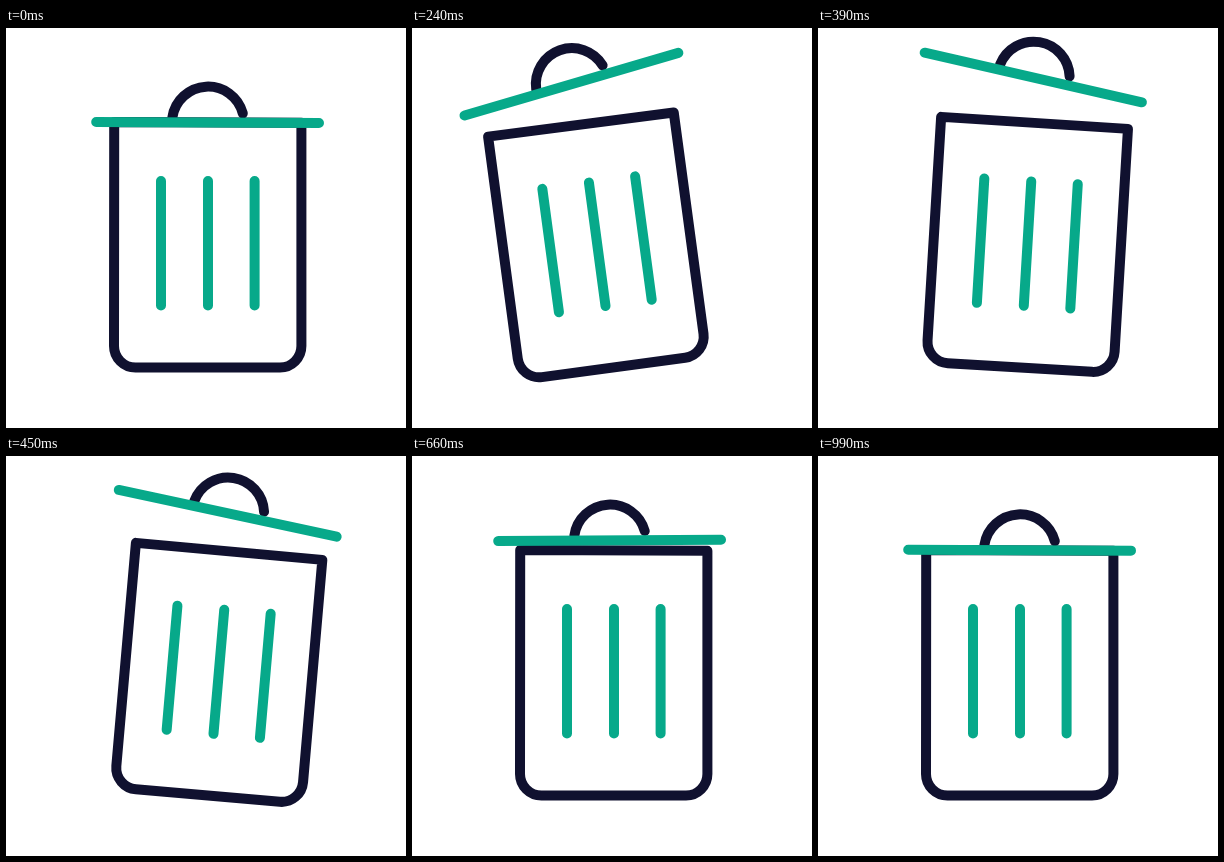
Write an HTML page that moves like this. It is 400 by 400 pixels and loops after 1.02 s.

```html
<!DOCTYPE html>
<html lang="en">
<head>
<meta charset="utf-8">
<title>Bin</title>
<style>
  html, body { margin: 0; height: 100%; overflow: hidden; background: #fff; }
  svg { display: block; width: 100%; height: 100%; }
  path { fill: none; stroke: #10112f; stroke-width: 10; stroke-linecap: round; stroke-linejoin: round; }
  .green { stroke: #07a98a; }
</style>
</head>
<body>
<svg viewBox="0 0 400 400">
  <g id="bin">
    <path d="M108.2 94 295.4 94.8V318A21.5 21.5 0 0 1 274 339.5H129.5A21.5 21.5 0 0 1 108 318Z"/>
    <path class="green" d="M155 153V277.5M202 153V277.5M248.6 153V277.5"/>
    <g id="lid">
      <path d="M166.4 89.3A36 36 0 0 1 236.8 85.4"/>
      <path class="green" d="M90.2 94.1 313 94.9"/>
    </g>
  </g>
</svg>
<script>
const LOOP = 1020, STEP = 30;
const bin = document.getElementById("bin"), lid = document.getElementById("lid");

const part = (t, from, to) => Math.min(1, Math.max(0, (t - from) / (to - from)));
const out = (t, from, to) => Math.sin(part(t, from, to) * Math.PI / 2);
const smooth = (t, from, to) => {
  const p = part(t, from, to);
  return p * p * (3 - 2 * p);
};

// The bin leans back, swings forward and stands up again.
const tilt = t => -10.1 * out(t, 0, 150) + 15.1 * smooth(t, 170, 445) - 5 * smooth(t, 445, 540);

// The lid flips open, overshoots and rocks to rest.
const lidTurn = t => -15 * out(t, 0, 150) + 24.5 * smooth(t, 160, 405)
  - 12.9 * smooth(t, 410, 550) + 4.2 * smooth(t, 560, 720) - 0.8 * smooth(t, 720, 990);

const lidX = t => -3.8 * out(t, 0, 120) - 1.9 * smooth(t, 390, 540) + 5.7 * smooth(t, 540, 870);

// Quick rise, then a soft sinking back.
const lidY = t => -47 * out(t, 0, 350) * Math.exp(-((Math.max(0, t - 360) / 230) ** 1.63));

function draw(now) {
  const t = Math.floor(now % LOOP / STEP) * STEP;
  bin.setAttribute("transform", `rotate(${tilt(t)} 201.3 341)`);
  lid.setAttribute("transform", `translate(${lidX(t)} ${lidY(t)}) rotate(${lidTurn(t)} 201.7 94.5)`);
}

let start;
function tick(now) {
  start ??= now;
  draw(now - start);
  requestAnimationFrame(tick);
}
draw(0);
requestAnimationFrame(tick);
</script>
</body>
</html>
```
